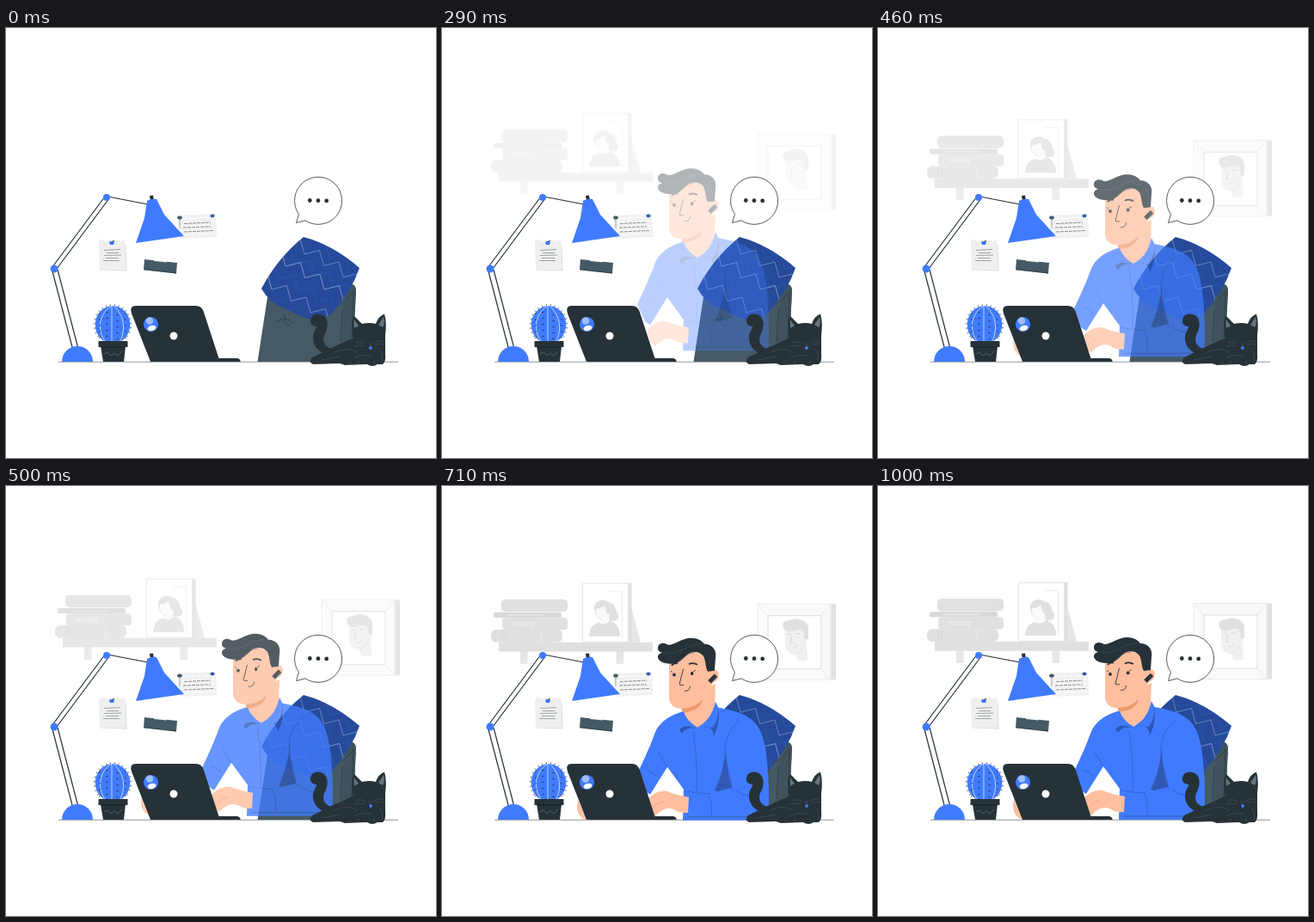
An HTML page with a canvas for the animation above (1040 ms loop, 500 by 500 pixels).

```html
<!DOCTYPE html>
<html lang="en">
<head>
<meta charset="utf-8">
<title>At the desk</title>
<style>
html, body { margin: 0; width: 100%; height: 100%; overflow: hidden; background: #fff; }
canvas { display: block; width: 500px; height: 500px; }
</style>
</head>
<body>
<canvas id="stage"></canvas>
<script>
const INK = '#263238', SLATE = '#455a64', BLUE = '#407bff', NAVY = '#264a99';
const SKIN = '#ffbe9d', TAN = '#eb996e';
const G1 = '#e0e0e0', G2 = '#e6e6e6', G3 = '#f0f0f0', G4 = '#fafafa';
const SIZE = 500, LOOP = 1040, FPS = 24, RISE = 20;

const dpr = window.devicePixelRatio || 1;
const makeCtx = c => {
  c.width = c.height = SIZE * dpr;
  return c.getContext('2d');
};
const main = makeCtx(document.getElementById('stage'));
const layer = makeCtx(document.createElement('canvas'));
const back = makeCtx(document.createElement('canvas'));
const front = makeCtx(document.createElement('canvas'));
let g = main;

const fill = (d, c) => { g.fillStyle = c; g.fill(new Path2D(d)); };
const line = (d, c, w = 0.6) => {
  g.strokeStyle = c;
  g.lineWidth = w;
  g.stroke(new Path2D(d));
};
const oval = (x, y, rx, c, ry = rx, a = 0) => {
  g.fillStyle = c;
  g.beginPath();
  g.ellipse(x, y, rx, ry, a, 0, 7);
  g.fill();
};
const box = (x, y, w, h, c, r = 0) => {
  g.fillStyle = c;
  g.beginPath();
  g.roundRect(x, y, w, h, r);
  g.fill();
};

function books() {
  box(69, 131, 77, 14.5, G1, 5);
  line('M76 134H140 M76 142H138', G2);
  box(60, 146.3, 79, 6.2, '#d8d8d8', 2);
  line('M76 149.5H118', G2, 1.6);
  box(70, 152.5, 76, 14, G1, 4);
  line('M76 154V165', G2, 1);
  g.fillStyle = G3;
  g.font = '500 8px Inter, sans-serif';
  g.fillText('steady', 82, 162);
  box(57, 166.3, 83, 14.7, G1, 6);
  line('M70 168V180 M74 168V180', '#d2d2d2', 0.8);
  line('M118 167Q112 174 118 181', G3, 1);
}

function smallFrame() {
  fill('M219 136L231 181H219Z', G2);
  box(215, 112, 5.5, 69, G1);
  box(163.5, 112.5, 53, 68, '#fff');
  line('M163.5 112.5H216.5V180.5H163.5Z', G2, 1);
  line('M194 121.5H209.5V174', G2, 0.7);
  fill('M177 142C176 134 186 129 193 134C201 135 202 142 203 146C208 151 204 157 198 156C190 158 182 155 179 150Z', G1);
  fill('M179 142Q185 142 189 138L192 149Q190 154 186 154Q179 153 179 146Z', G4);
  fill('M186 150L194 147L195 158L185 160Z', G4);
  fill('M171 174Q172 160 183 158Q189 162 196 156Q207 160 207 174Z', G1);
}

function bigFrame() {
  box(452, 136.5, 6, 88, G1);
  box(367, 136.5, 85.5, 88, G4);
  line('M367 136.5L379 150M452 136.5L441 150M367 224.5L379 212M452 224.5L441 212M367 136.5H452V224.5H367Z', G1);
  box(379, 150, 62, 62, '#fff');
  line('M379 150H441V212H379Z', '#d0d0d0', 0.7);
  fill('M399 161L399 184Q402 197 411 195L413 202H425L423 164Z', G3);
  line('M411 195Q418 192 420 186', G1, 1);
  fill('M397 164C394 157 400 156 405 155C413 151 424 155 426 163L426 177L422 178L420 167C414 163 406 171 399 167Z', G1);
  line('M402 172L406 171M411 171L416 171M407 173L405 181H408M408 187Q412 187 413 184', '#d0d0d0', 0.8);
}

function backdrop() {
  box(91, 191, 8.5, 15, G2);
  box(202.5, 191, 8.5, 15, G2);
  box(66, 181, 179, 10.7, G1);
  books();
  smallFrame();
  bigFrame();
}

function shirt() {
  fill('M278 262C263 267 252 274 247 288C241 305 233 321 227 334L236 354L242 358L262 326L281 352L280 388H380V350C379 325 377 298 370 284C363 269 350 262 322 257Z', BLUE);
  fill('M330 296C330 318 324 340 317 353Q328 358 339 355C333 338 329 318 330 296Z', '#3058b4');
  fill('M283 358Q305 359 318 355L356 345L378 352L379 379H286Z', BLUE);
  line('M346 272C330 285 326 304 331 322Q336 342 338 354', '#2c56b3');
  line('M252 309L257 318L262 326M238 330Q246 332 250 337M292 284Q297 315 296 355M310 359Q315 368 313 382M341 353Q352 360 357 359M282 354Q298 357 311 357', '#2c56b3');
  line('M285 384H370', '#2f5299', 0.8);
}

function collar() {
  fill('M279 250L318 229L317 256Q313 271 297 280Q284 272 281 262Z', SKIN);
  fill('M278 257Q291 257 303 248Q300 261 280 263Z', TAN);
  fill('M280 261L276 283Q280 279 285 281L297 280Q287 276 280 261Z', BLUE);
  fill('M318 250L322 258Q322 277 316 290Q311 279 297 280Q313 272 318 250Z', BLUE);
  fill('M276 283Q281 275 296 281Q284 279 279 287Z', '#2d56b3');
  fill('M304 280Q315 277 316 290Q323 277 322 258Q320 276 314 280Z', '#2d56b3');
}

function head() {
  fill('M264 203V242C263 253 270 259 280 258Q296 257 304 246L316 227V201L290 190Z', SKIN);
  oval(317, 220, 4.8, SKIN, 7, 0.2);
  fill('M251 188C251 182 257 180 263 184C271 184 279 176 290 176C297 176 302 179 305 183C314 183 320 190 318 199L317 214L309 215C306 210 307 203 304 197C300 192 293 191 287 194C280 199 276 207 266 206C257 206 250 202 251 197Q252 194 256 193Q251 192 251 188Z', INK);
  line('M258 193C276 198 284 182 302 183M275 203Q284 194 294 193', SLATE, 0.5);
  line('M267 208Q269 205 274 205.5M287 206.5Q292 204 297 207', INK, 1.8);
  oval(270, 218.8, 1.8, INK, 2.1);
  oval(290.7, 217.3, 1.8, INK, 2.1);
  line('M268 216L266 214.5M292 215L295 213.5', INK, 0.8);
  line('M280.5 212L276 230Q278 231.5 281 230.5M282 237.5Q288 238 288.5 232', INK, 0.9);
  line('M311 227L318.5 219.5', INK, 5);
  line('M315 224L319 218.5', SLATE, 0.8);
}

function person() {
  shirt();
  collar();
  head();
  fill('M158 364L169 388C159 386 155 376 158 364Z', SKIN);
  fill('M287 361L286 379Q277 380 271 376Q260 370 248 383L243 379L238 364Q250 352 261 354Q273 359 287 361Z', SKIN);
  line('M258 366Q249 368 245 374', TAN);
}

function lamp() {
  line('M53.5 281L77.5 373M60 281L84 373M54.2 277.5L114.7 196.5M58.6 280.5L119 199.5M118 196L165 205', INK, 1.2);
  fill('M65 388A18 18 0 0 1 101 388Z', BLUE);
  oval(56, 280, 4.5, BLUE);
  oval(117, 197, 4, BLUE);
  fill('M167 195L171 194.5L172 201H168Z', INK);
  fill('M164 201Q169 198 175 199L184 217L207 242L151 250L161 221Z', BLUE);
}

function notes() {
  fill('M108 248L112 245L116 248L120 246L125 248L130 246L134 248L138 246L140 282L109 280Z', '#efefef');
  line('M139 252L140 282L109 281', '#d5d5d5', 0.8);
  line('M114 258.5L133 257.5M117 261.5H131M114 264.5L134 264M116 267.5H131M113 270.5H132', '#7b858a', 0.7);
  oval(123, 250, 2.8, BLUE, 2.2);
  line('M123 249L126 247', INK, 1);

  fill('M199 218L244 216L245.5 243L203 245Z', G3);
  for (let i = 0; i < 5; i++) {
    line(`M201 ${222 + i * 4.7}L245 ${220 + i * 4.7}`, '#fff', 0.8);
    line(`M${209 + i * 8} 217V244`, '#fafafa', 0.6);
  }
  g.setLineDash([4, 1]);
  line('M207 227.5L238 226M206 232L238 230.8M207 237L241 235.5', '#7b858a', 0.9);
  g.setLineDash([]);
  oval(202, 220.5, 2.8, SLATE, 2);
  line('M202 222V233', SLATE, 0.5);
  oval(240, 218.5, 2.5, '#345eac', 2);

  fill('M161 269L199 273L198 285.5L160 281Z', SLATE);
  line('M160.5 281L198 285', INK, 0.7);
  line('M172 270.3L187 271.8', G3, 1.5);
}

// Stair-like knit stripe: long flat runs with steep drops.
function knit(x, y, n, c) {
  let d = `M${x} ${y}`;
  for (let i = 0; i < n; i++) d += 'l5 18l17.5 -4.5';
  line(d, c, 0.55);
}

function chair() {
  fill('M306 300L292.5 388H390L404 366L407 305Q406 298 399 297L380 300Z', SLATE);
  fill('M400 297Q407 298 407 305L404 366L388 388L392 325Z', '#40535c');
  line('M403 308L389 322M391 326L389 364M404 305L402 364', INK, 0.6);
  line('M314 342Q324 334 334 343M319 338Q325 344 331 347M323 332L325 341', INK, 0.6);
  const coat = 'M346 243Q380 252 411 279Q402 306 379 332Q363 343 347 337L319 324Q306 319 297 303Q316 267 346 243Z';
  fill(coat, NAVY);
  g.save();
  g.clip(new Path2D(coat));
  knit(342, 245, 4, '#9fb2e0');
  knit(331, 257, 4, '#315dc0');
  knit(320, 259, 5, '#c2cfee');
  knit(312, 274, 5, '#315dc0');
  knit(304, 286, 5, '#aebfe6');
  knit(371, 249, 3, '#315dc0');
  g.restore();
}

function cactus() {
  let d = '';
  for (let i = 0; i < 20; i++) {
    const a = 2.5 + i * 0.232, c = Math.cos(a), s = Math.sin(a);
    d += `M${124 + 19 * c} ${345 + 21 * s}L${124 + 22.3 * c} ${345 + 24 * s}`;
  }
  line(d, INK, 0.7);
  oval(124, 345, 20.3, BLUE, 22);
  line('M123 323C107 332 106 354 116 365M125 323C139 335 139 354 132 365M123 323V366', '#dbe6ff', 0.8);
  d = '';
  for (let i = 0; i < 5; i++) {
    const y = 331 + i * 7;
    d += `M116 ${y}l3 -1M128 ${y + 2}l3 1M108 ${y + 2}l2 -2M138 ${y}l2 2`;
  }
  line(d, INK, 0.8);
  fill('M110 370H139L137 388H113Z', INK);
  box(107.5, 364, 34, 7, INK, 0.5);
  line('M111 371H138', '#11191d', 0.8);
  line('M114 379l4 -2l4 4l4 -3l4 3l5 -5', '#71818a', 0.6);
}

function laptop() {
  fill('M151 323H221Q227 323 229.5 329L247.5 384H269Q273 385 272.5 388H168L146 332Q143 323 151 323Z', INK);
  oval(195, 358, 4.5, '#fff');
  oval(168.5, 344.5, 8.6, BLUE);
  oval(167, 340.5, 4.3, '#a0bdff');
  oval(169.5, 349, 5, '#fff', 3, -0.25);
}

function cat() {
  fill('M354 339C356 331 366 331 371 336C376 343 373 352 370 357C368 363 369 370 378 373L374 380C362 377 356 368 357 358C358 352 362 349 361 347C356 347 353 343 354 339Z', INK);
  fill('M405 360Q392 366 376 373Q367 378 356 383Q351 388 357 391L388 390L394 392L420 391Q426 395 432 391L438 391Q442 388 441 379V352Z', INK);
  fill('M403 350Q401 339 405 335L414 344Q423 342 430 344Q433 335 440 332.5Q443 342 441 358Q439 374 423 375Q405 374 403 357Z', INK);
  fill('M404.5 339L410 346L405 349Z', '#66757d');
  fill('M439 336Q441 344 438 348L433 345Z', '#66757d');
  line('M407 366Q412 363 418 367M428 366Q434 363 438 364M405 370L417 369M430 368L441 367M422 366L424 369L426 366M382 377Q397 370 408 377M367 386L388 382M405 384Q414 379 425 381M400 388V391M410 387V391M428 387V391M434 374Q439 379 437 387', SLATE, 0.6);
  oval(424, 372, 1.9, BLUE, 2.1);
}

function bubble() {
  const d = 'M340.5 216.5L337.5 226.5L348 223.8A27.5 27.5 0 1 0 340.5 216.5Z';
  fill(d, '#fff');
  line(d, INK, 0.8);
  for (let i = 0; i < 3; i++) oval(353.3 + i * 9.7, 200.5 + i * 0.2, 2.4, INK);
}

function paintOn(ctx, dy, ...parts) {
  g = ctx;
  g.setTransform(1, 0, 0, 1, 0, 0);
  g.clearRect(0, 0, SIZE * dpr, SIZE * dpr);
  g.setTransform(dpr, 0, 0, dpr, 0, dy * dpr);
  parts.forEach(f => f());
}

const desk = () => line('M61 388.3H456', INK, 0.5);
paintOn(back, 0, desk, notes, lamp, chair);
paintOn(front, 0, cactus, laptop, cat, bubble);

// cubic-bezier(.36, -.01, .5, 1.38)
function ease(x) {
  if (x <= 0) return 0;
  if (x >= 1) return 1;
  const curve = (s, a, b) => 3 * (1 - s) * (1 - s) * s * a + 3 * (1 - s) * s * s * b + s * s * s;
  let lo = 0, hi = 1;
  for (let i = 0; i < 24; i++) {
    const mid = (lo + hi) / 2;
    if (curve(mid, 0.36, 0.5) < x) lo = mid; else hi = mid;
  }
  return curve(lo, -0.01, 1.38);
}

// Steps of 1/24 s, each starting on a whole 10 ms.
function stepAt(t) {
  let i = FPS;
  while (i > 0 && Math.round(i * 100 / FPS) * 10 > t) i--;
  return i;
}

function blend(part, p) {
  paintOn(layer, RISE * (p - 1), part);
  main.globalAlpha = Math.min(1, Math.max(0, p));
  main.drawImage(layer.canvas, 0, 0);
  main.globalAlpha = 1;
}

let shown = -1;
function draw(now) {
  const i = stepAt(now % LOOP);
  if (i !== shown) {
    shown = i;
    const p = i ? ease(i / FPS + 0.025) : 0;
    main.fillStyle = '#fff';
    main.fillRect(0, 0, SIZE * dpr, SIZE * dpr);
    blend(backdrop, p);
    main.drawImage(back.canvas, 0, 0);
    blend(person, p);
    main.drawImage(front.canvas, 0, 0);
  }
  requestAnimationFrame(() => draw(performance.now()));
}
draw(0);
</script>
</body>
</html>
```
